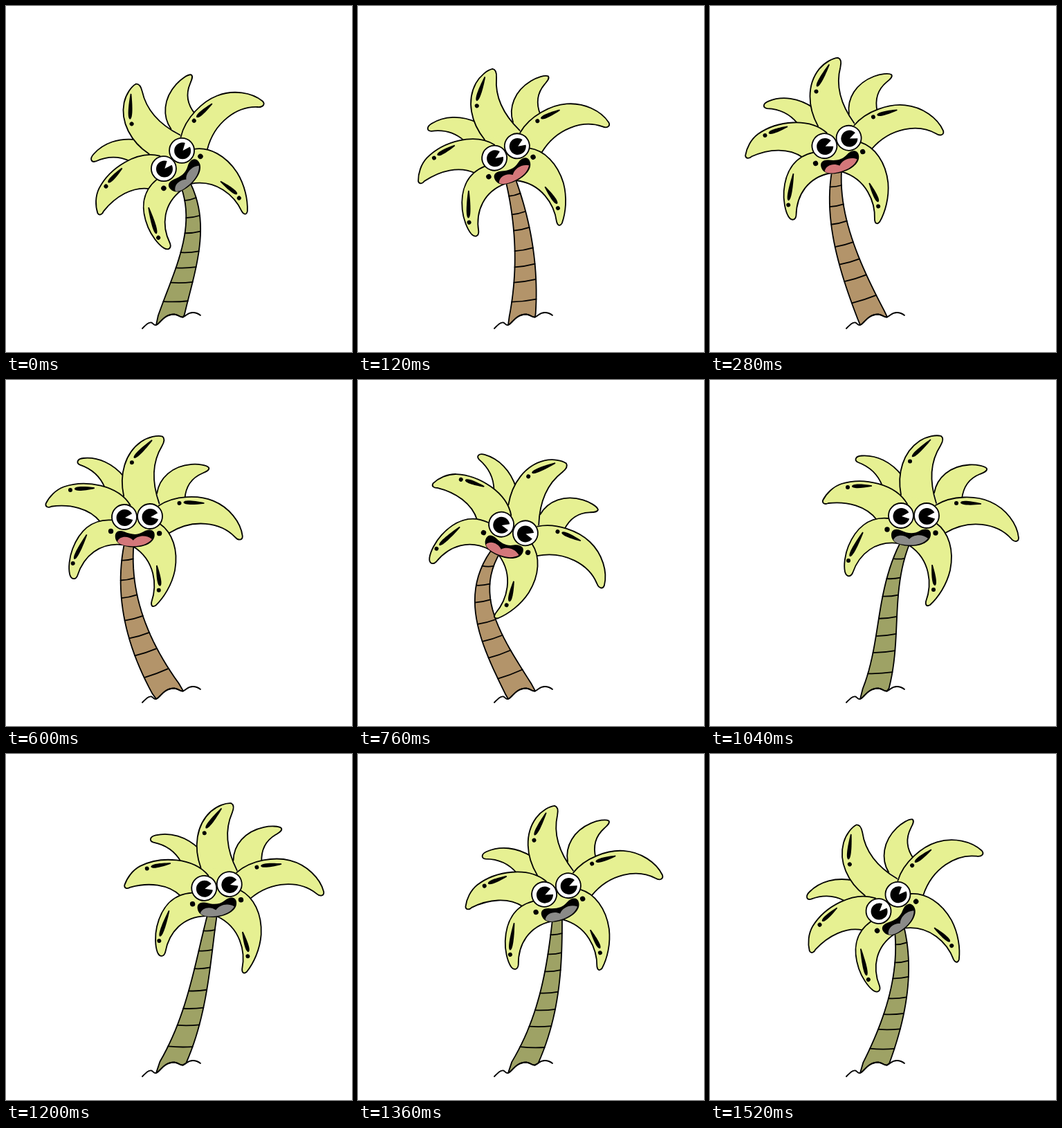
An HTML page for the animation above (1600 ms loop, 500 px wide and 500 px high).

```html
<!DOCTYPE html>
<html lang="en">
<head>
<meta charset="utf-8">
<title>Dancing palm</title>
<style>
  html, body { margin: 0; height: 100%; overflow: hidden; background: #fff; }
  svg { display: block; width: 100vw; height: 100vh; }
  .line { fill: none; stroke: #000; stroke-width: 1.8; stroke-linecap: round; stroke-linejoin: round; }
  .leaf { fill: #e6f092; }
</style>
</head>
<body>
<svg viewBox="0 0 500 500">
  <path id="trunk" class="line"/>
  <path id="bands" class="line"/>
  <path class="line" d="M197 466C203 460 206 457 210 457.500C213 458 213 462 217 461C223 459 227 446 243 445.500C250 446 250 450 256 449.500C262 447 262 443 270 443Q276 443 281 447"/>
  <g id="head">
    <g class="line leaf" style="fill:#e6f092">
      <path d="M278 139C262 118 240 108 219 109.500C210 110 208 116 214 119C230 125 243 137 249 153L275 170"/>
      <path d="M324 163C328 141 347 124 375 122.500C385 122 397 124 400 128C401 132 395 134 390 136C375 142 366 153 364 172L330 185"/>
    </g>
    <path class="leaf" d="M241 202L276 164L327 178L340 221L288 240L272 237Z"/>
    <g class="line" style="fill:#e6f092">
      <path d="M276 166C270 135 279 104 303 88C314 81 327 79 334 81C338 84 336 90 333 95C317 120 318 150 327 178"/>
      <path d="M285 179C268 150 222 140 190 150C178 154 168 164 163 174C162 179 167 180 171 178C198 175 226 182 241 202"/>
      <path d="M326 181C350 166 385 167 405 176C428 186 444 208 446 228C446 234 440 235 435 229C415 207 375 200 340 221"/>
      <path d="M258 200C228 197 210 216 200 240C195 252 193 268 195 277C197 285 203 285 206 279C216 250 240 232 272 236"/>
      <path d="M327 207C345 220 353 246 347 275C342 296 330 314 318 325C313 328 311 325 312 320C321 296 319 260 288 239"/>
    </g>
    <g id="shines"></g>
    <circle cx="256" cy="216" r="3.700"/>
    <circle cx="326" cy="221" r="3.700"/>
    <path d="M262 224C262 217 267 214 275 217C286 222 294 223 303 218C312 213 320 216 319 224C318 235 303 241 287 240C272 239 262 234 262 224Z"/>
    <path id="tongue" d="M265 231C269 223 281 223 288 230C294 223 307 222 315 229C309 236 299 239 287 238.500C276 238 268 236 265 231Z"/>
    <g id="eyes"></g>
  </g>
</svg>
<script>
const $ = id => document.getElementById(id);
const LOOP = 1600;
const BANDS = [.1, .23, .345, .49, .605, .715, .855];

// Times at which the drawing changes; it holds in between.
const STEPS = [0, 40, 120, 200, 280, 360, 440, 600, 680, 760, 800,
  880, 960, 1040, 1120, 1200, 1360, 1440, 1520];

// time, head x, head y, head angle, lower trunk bend, upper trunk bend
const KEYS = [
  [0, 241, 222, -45, 18, 27],
  [120, 213.5, 211, -28, 10, 20],
  [280, 183, 196.5, -18, -33, -8],
  [440, 177.5, 191, -9, -44, -8],
  [600, 189.5, 197.5, -1.5, -48, -10],
  [760, 224.5, 215, 20, -38, -45],
  [800, 250, 219, 19, -32, -58],
  [880, 268.5, 211.5, 8, -25, -58],
  [1040, 294.5, 196, 0, 27, -33],
  [1200, 304.5, 191, -9, 40, -15],
  [1360, 286.5, 196.5, -20, 40, -4],
  [1520, 257.5, 215, -41, 30, 11]
];

function keyAt(i) {
  const n = KEYS.length, [time, ...pose] = KEYS[(i + n) % n];
  return { time: time + Math.floor(i / n) * LOOP, pose };
}

// Smooth cubic through the keys, wrapping around the loop.
function poseAt(time) {
  const i = KEYS.findLastIndex(k => k[0] <= time);
  const [p, a, b, n] = [i - 1, i, i + 1, i + 2].map(keyAt);
  const span = b.time - a.time, u = (time - a.time) / span;
  return a.pose.map((from, j) => {
    const to = b.pose[j];
    const m0 = (to - p.pose[j]) / (b.time - p.time) * span;
    const m1 = (n.pose[j] - from) / (n.time - a.time) * span;
    const s = u * u * (3 - 2 * u);
    return from + (to - from) * s + m0 * u * (1 - u) ** 2 - m1 * u * u * (1 - u);
  });
}

const bezier = (a, b, c, d, t) =>
  a * (1 - t) ** 3 + 3 * b * t * (1 - t) ** 2 + 3 * c * t * t * (1 - t) + d * t ** 3;

function drawTrunk(x, y, angle, lowBend, highBend) {
  const r = angle * Math.PI / 180, cos = Math.cos(r), sin = Math.sin(r);
  const topX = x - 13 * cos - 40 * sin, topY = y - 13 * sin + 40 * cos;
  const baseX = 236.5, baseY = 455;
  const centre = t => bezier(baseX, baseX + lowBend, topX + highBend, topX, t);
  const height = baseY - topY;

  const edge = (t, side) => {
    const lean = (centre(t + .01) - centre(t - .01)) / (.02 * height);
    const half = side * (19.5 - 12.5 * t);
    const rise = t ? .15 - .4 * lean : .3;
    return [centre(t) + half, baseY - height * t - half * rise]
      .map(v => v.toFixed(2)).join(" ");
  };
  const ts = Array.from({ length: 25 }, (_, i) => i / 24);
  const right = ts.map(t => edge(t, 1)), left = ts.map(t => edge(t, -1)).reverse();
  $("trunk").setAttribute("d",
    `M${right.join("L")}L${left.join("L")}C223 459 227 446 243 445.5C250 446 250 450 256 449.5`);
  $("bands").setAttribute("d", BANDS.map(f => {
    const t = 1 - f, [lx, ly] = edge(t, -1).split(" ").map(Number);
    const [rx, ry] = edge(t, 1).split(" ").map(Number);
    return `M${lx} ${ly}Q${(lx + rx) / 2} ${(ly + ry) / 2 + 1.5} ${rx} ${ry}`;
  }).join(""));
}

// A dot and a streak that thins out from (x1, y1) to (x2, y2).
function shine(dotX, dotY, x1, y1, x2, y2) {
  const dx = x2 - x1, dy = y2 - y1, len = Math.hypot(dx, dy);
  const point = (along, off) =>
    `${x1 + dx * along - dy / len * off} ${y1 + dy * along + dx / len * off}`;
  return `<circle cx="${dotX}" cy="${dotY}" r="3"/>
    <path d="M${point(0, 0)}C${point(.02, 4)} ${point(.45, 3.4)} ${point(1, .8)}
      L${point(1, -.8)}C${point(.45, -3.4)} ${point(.02, -4)} ${point(0, 0)}Z"/>`;
}

const eye = x => `<circle cx="${x}" cy="196" r="18" fill="#fff" stroke="#000" stroke-width="1.8"/>
  <circle cx="${x + .5}" cy="197" r="12"/>
  <path d="M${x + 1} 197L${x + 14} 190L${x + 14} 201Z" fill="#fff"/>`;

$("shines").innerHTML = [
  [289, 117.5, 292, 111, 319, 86],
  [199, 155, 205, 153.5, 234, 153],
  [200, 261, 202, 255, 221, 220],
  [356, 178, 362, 177, 392, 179],
  [323, 303, 325, 297, 321, 267]
].map(s => shine(...s)).join("");
$("eyes").innerHTML = eye(276) + eye(313);

function frame() {
  const now = performance.now() % LOOP;
  const time = STEPS.findLast(s => s <= now);
  const pose = poseAt(time), [x, y, angle] = pose;
  const warm = time >= 40 && time < 1000;
  $("head").setAttribute("transform",
    `translate(${x} ${y}) rotate(${angle}) translate(-294.5 -196)`);
  drawTrunk(...pose);
  $("trunk").style.fill = warm ? "#b3946a" : "#9ea265";
  $("tongue").style.fill = warm ? "#d4777a" : "#8a8a88";
  requestAnimationFrame(frame);
}
frame();
</script>
</body>
</html>
```
